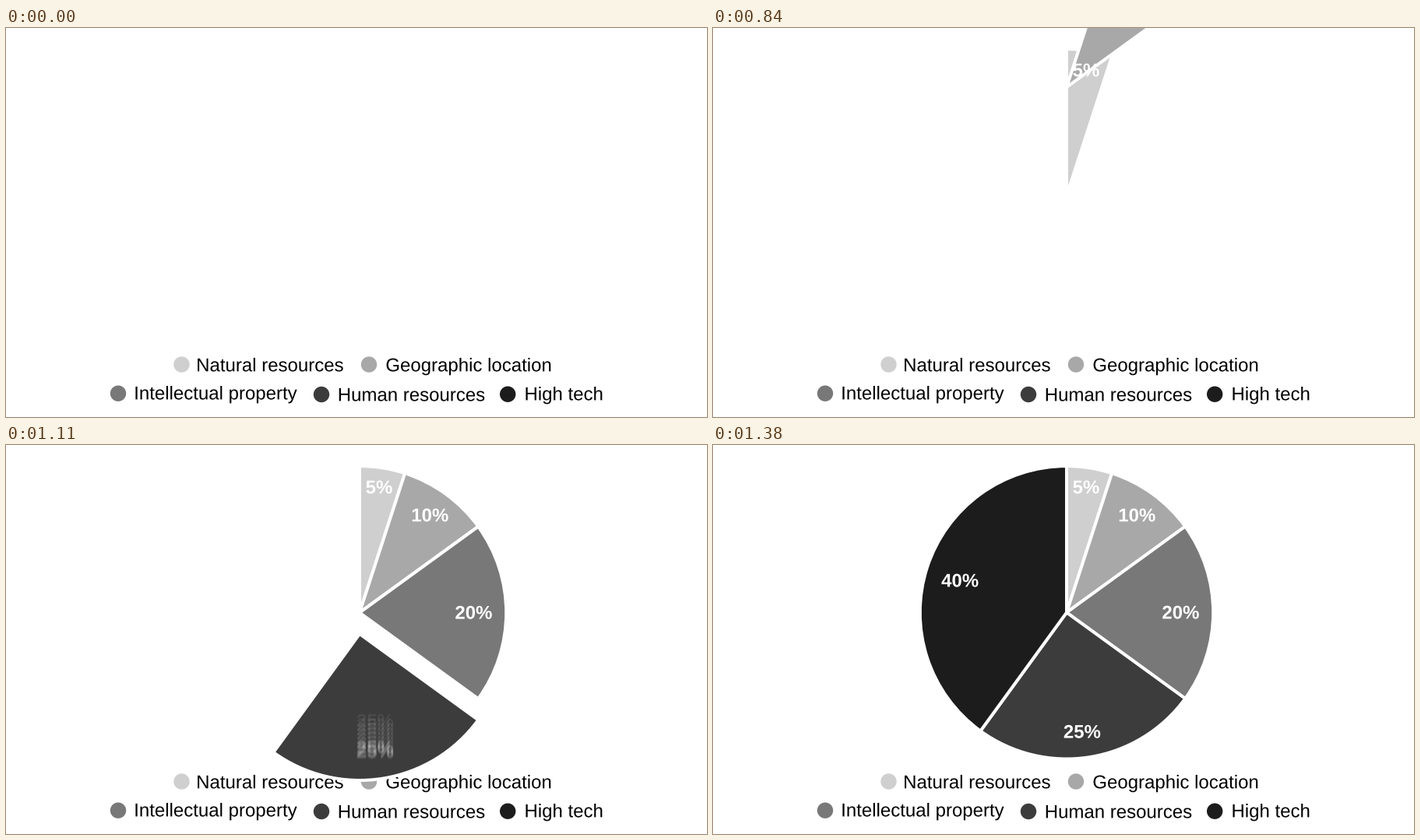
Recreate the animation shown at these times as a matplotlib script. Size 900x500 px, loop 6300 ms.

```python
import math

import matplotlib.pyplot as plt
import numpy as np
from matplotlib.animation import FuncAnimation
from matplotlib.patches import Circle, PathPatch, Wedge
from matplotlib.textpath import TextPath
from matplotlib.transforms import Affine2D

W, H, DPI = 900, 500, 100
STEP, LOOP = 30, 6300
CX, CY, R = 454, 215.3, 188.2
SHUTTER, SAMPLES = 15, 16
PEAK_AT, PEAK, START = 60, 27.5, -306
SETTLED = 210
FONT_PX = 24
HALF_CAP = 8.3

SHADES = ["#cfcfcf", "#a8a8a8", "#787878", "#3c3c3c", "#1c1c1c"]

# percent, label centre, time the fall begins
SLICES = [
    (5, (479, 54), 360),
    (10, (544.7, 90), 810),
    (20, (600.5, 215), 930),
    (25, (474, 368.3), 1050),
    (40, (317, 174), 1170),
]

# name, dot centre, text centre
LEGEND = [
    ("Natural resources", (225.5, 432.5), (339.4, 433)),
    ("Geographic location", (466, 432.5), (593.9, 433)),
    ("Intellectual property", (144, 469.7), (270, 469.1)),
    ("Human resources", (405, 471), (521, 471.1)),
    ("High tech", (644.2, 470.7), (716.4, 470.1)),
]

fig = plt.figure(figsize=(W / DPI, H / DPI), dpi=DPI, facecolor="white")
ax = fig.add_axes([0, 0, 1, 1])
ax.set_xlim(0, W)
ax.set_ylim(H, 0)
ax.axis("off")


def text_path(text, center, weight="normal"):
    """Outline of a text whose ink is centred across and caps centred down."""
    font = {"family": "Liberation Sans", "weight": weight}
    path = TextPath((0, 0), text, size=FONT_PX, prop=font)
    box = path.get_extents()
    x = center[0] - (box.x0 + box.x1) / 2
    return Affine2D().scale(1, -1).translate(x, center[1] + HALF_CAP).transform_path(path)


def add_path(path, color, z):
    return ax.add_patch(PathPatch(path, facecolor=color, linewidth=0, zorder=z))


def drop(t):
    """Vertical offset t ms into the fall: steady drop, then a damped bounce."""
    if t >= SETTLED:
        return 0.0
    if t <= PEAK_AT:
        return START + (PEAK - START) * t / PEAK_AT
    u = t - PEAK_AT
    return PEAK * math.cos(2 * math.pi * u / 130) * math.exp(-u / 25)


class Slice:
    def __init__(self, percent, pos, start, begin, color, z):
        self.start = start
        sweep = percent * 3.6
        # The y axis points down, so angles run clockwise from the top at -90
        self.wedge = Wedge((CX, CY), R, begin - 90, begin + sweep - 90,
                           facecolor=color, edgecolor="white",
                           linewidth=4 * 72 / DPI, joinstyle="miter", zorder=z)
        ax.add_patch(self.wedge)
        path = text_path(f"{percent}%", pos, "bold")
        self.labels = [add_path(path, "white", 20 + z) for _ in range(SAMPLES)]

    def show_label(self, offsets, alpha):
        for i, label in enumerate(self.labels):
            used = i < len(offsets)
            label.set_visible(used)
            if used:
                shift = Affine2D().translate(0, offsets[i])
                label.set_transform(shift + ax.transData)
                label.set_alpha(alpha)

    def update(self, now):
        t = now - self.start
        self.wedge.set_visible(t >= 0)
        if t < 0:
            self.show_label([], 1)
            return
        self.wedge.set_center((CX, CY + drop(t)))
        half = SHUTTER / 2
        trail = [drop(s) for s in np.linspace(t - half, t + half, SAMPLES)]
        spread = max(trail) - min(trail)
        if t >= SETTLED or spread < 1:
            self.show_label([drop(t)], 1)
        else:
            self.show_label(trail, 1.2 / SAMPLES if spread > 12 else 0.25)


for (name, dot, center), shade in zip(LEGEND, SHADES):
    ax.add_patch(Circle(dot, 10.2, facecolor=shade, linewidth=0, zorder=1))
    add_path(text_path(name, center), "black", 1)

slices = []
angle = 0
for z, ((percent, pos, start), shade) in enumerate(zip(SLICES, SHADES), 2):
    slices.append(Slice(percent, pos, start, angle, shade, z))
    angle += percent * 3.6


def update(frame):
    for part in slices:
        part.update(frame * STEP)
    return []


def reset():
    return update(0)


anim = FuncAnimation(fig, update, frames=LOOP // STEP, init_func=reset,
                     interval=STEP, repeat=True, repeat_delay=0,
                     cache_frame_data=False)
plt.show()
```
